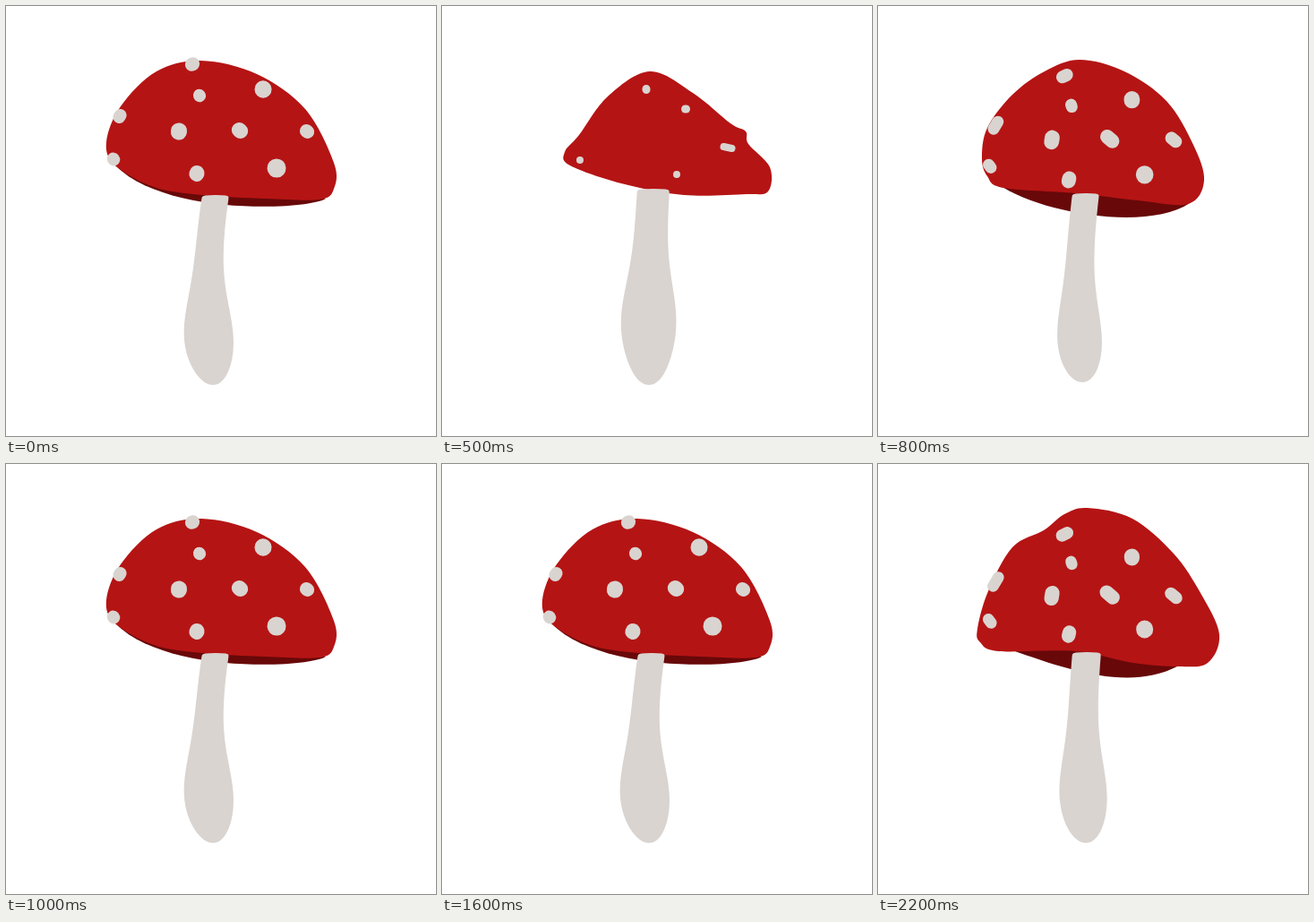
Write an HTML page with a canvas that moves like this. It is 480 by 480 pixels and loops after 2300 ms.

```html
<!DOCTYPE html>
<html lang="en">
<meta charset="utf-8">
<title>Mushroom</title>
<style>
  html, body { margin: 0; width: 100%; height: 100%; overflow: hidden; background: #fff; }
  canvas { display: block; }
</style>
<canvas id="stage" width="480" height="480"></canvas>
<script>
const ctx = document.getElementById('stage').getContext('2d');
const RED = '#b51414', DARK = '#680809', PALE = '#d9d4d0';
const FOOT = 423;

// Each spot: x, y, width and the direction in which it smears.
const SPOTS = [
  [208,65,15, 6,-3], [127,123,14, -6,10], [120,171,14, 3,4], [216,100,14, 1,3],
  [287,93,19, 0,2], [336,140,15, 6,5], [193,140,18, -1,6], [261,139,17, 7,6],
  [302,181,21, 0,1], [213,187,17, -1,4]
];
const YOUNG_SPOTS = [
  [228,93,9, 0,1], [272,115,9, 1,0], [319,158,8, 9,2], [154,172,8, 0,0], [262,188,8, 0,0]
];

// Spreads the spots about a point low on the cap and smears them.
const arrange = (sx, sy, dy, smear, size) => SPOTS.map(([x, y, w, mx, my]) =>
  [215 + (x - 215) * sx, 187 + dy + (y - 187) * sy, w * size, mx * smear, my * smear]);

// stem.spine holds the x of a quadratic curve; cap holds key points of a smooth outline;
// under is one cubic curve along the lower rim.
const bud = { stem: { top: 271, spine: [212, 216, 232], neck: 25, belly: 2, tip: 12, foot: 4 } };
const young = {
  stem: { top: 204, spine: [236, 229, 231], neck: 18, belly: 13, bulge: 0.69 },
  cap: [137,163, 153,144, 185,101, 232,73, 280,97, 322,131, 339,140, 342,154, 366,180,
    364,207, 340,210, 270,211, 200,198, 143,178],
  spots: YOUNG_SPOTS
};
const leanLeft = {
  stem: { top: 211, spine: [234, 218, 231], neck: 15, belly: 13 },
  under: [122,178, 180,236, 340,227, 357,215],
  cap: [112,152, 128,112, 168,73, 218,61, 280,76, 334,115, 366,175, 366,204, 350,216,
    290,215, 219,211, 165,202, 122,178],
  spots: arrange(1, 1, 0, 0.2, 1)
};
const round = {
  stem: { top: 209, foot: 12, spine: [232, 219, 228], neck: 15, belly: 10.5, bulge: 0.8, base: 420 },
  under: [134,199, 180,231, 300,252, 348,220],
  cap: [116,170, 122,136, 150,99, 186,73, 225,60, 275,73, 322,106, 352,155, 364,195,
    346,221, 290,217, 220,209, 140,203, 122,190],
  spots: arrange(0.95, 0.95, 7, 0.8, 0.93)
};
const wide = {
  stem: { top: 210, spine: [233, 224, 232], neck: 16, belly: 11 },
  under: [150,208, 210,229, 280,254, 334,226],
  cap: [111,184, 123,142, 150,93, 185,74, 208,56, 234,49, 284,61, 330,100, 360,144,
    381,190, 368,222, 335,226, 285,222, 220,209, 135,209, 114,199],
  spots: arrange(0.95, 0.915, 3, 1, 0.9)
};

// A bulging tube around the spine, closed off at tip and foot.
function drawStem({ top, spine: [a, b, c], neck, belly, bulge = 0.77, tip = 300, foot = 12, base = FOOT }) {
  const right = [], left = [], n = 60;
  for (let i = 0; i <= n; i++) {
    const u = (1 - Math.cos(Math.PI * i / n)) / 2, v = 1 - u;
    const x = a * v * v + 2 * b * u * v + c * u * u;
    const y = top + (base - top) * u;
    const swell = belly * Math.exp(-(((u - bulge) / 0.2) ** 2) / 2);
    const half = (neck + swell) * Math.sqrt((1 - u ** foot) * (1 - v ** tip));
    right.push([x + half, y]);
    left.unshift([x - half, y]);
  }
  ctx.beginPath();
  for (const p of [...right, ...left]) ctx.lineTo(...p);
  ctx.fillStyle = PALE;
  ctx.fill();
}

function drawUnder([x, y, ...curve]) {
  ctx.beginPath();
  ctx.moveTo(x, y);
  ctx.bezierCurveTo(...curve);
  ctx.lineTo(232, 180);
  ctx.fillStyle = DARK;
  ctx.fill();
}

// Closed Catmull-Rom curve through the key points.
function drawCap(points) {
  const n = points.length / 2;
  const at = i => points.slice((i + n) % n * 2, (i + n) % n * 2 + 2);
  ctx.beginPath();
  ctx.moveTo(...at(0));
  for (let i = 0; i < n; i++) {
    const [a, b, c, d] = [at(i - 1), at(i), at(i + 1), at(i + 2)];
    ctx.bezierCurveTo(b[0] + (c[0] - a[0]) / 6, b[1] + (c[1] - a[1]) / 6,
      c[0] - (d[0] - b[0]) / 6, c[1] - (d[1] - b[1]) / 6, ...c);
  }
  ctx.fillStyle = RED;
  ctx.fill();
}

function drawSpots(spots, size) {
  ctx.strokeStyle = PALE;
  ctx.lineCap = 'round';
  for (const [x, y, w, mx, my] of spots) {
    ctx.lineWidth = w * size;
    ctx.beginPath();
    ctx.moveTo(x - mx / 2, y - my / 2);
    ctx.lineTo(x + mx / 2 + 0.01, y + my / 2);
    ctx.stroke();
  }
}

function scaleAt(x, y, sx, sy) {
  ctx.translate(x, y);
  ctx.scale(sx, sy);
  ctx.translate(-x, -y);
}

function draw({ pose, sx = 1, sy = 1, pivotY = FOOT, cap = 1, spot = 1 }) {
  ctx.clearRect(0, 0, 480, 480);
  ctx.save();
  scaleAt(232, pivotY, sx, sy);
  if (pose.under) drawUnder(pose.under);
  if (pose.cap) {
    ctx.save();
    scaleAt(236, 208, cap, cap);
    drawCap(pose.cap);
    drawSpots(pose.spots, spot);
    ctx.restore();
  }
  drawStem(pose.stem);
  ctx.restore();
}

const [a, b, c] = [leanLeft, round, wide].map(pose => ({ pose }));
const sprout = [1, 2, 3].map(i => ({ pose: bud, sx: Math.sqrt(i / 3), sy: i / 3 }));
const wobble = Array.from({ length: 12 }, (_, i) => [b, c, a][i % 3]);
const steps = [
  a,
  ...sprout,
  { pose: young, sy: 0.86, cap: 0.55, spot: 0 },
  { pose: young },
  { pose: round, sx: 0.98, sy: 0.98, spot: 0.7 },
  { pose: wide, sx: 1.04, sy: 1.02, pivotY: 49 },
  ...wobble, b, a, c
];

function frame() {
  draw(steps[Math.floor(performance.now() / 100) % steps.length]);
  requestAnimationFrame(frame);
}
frame();
</script>
</html>
```
